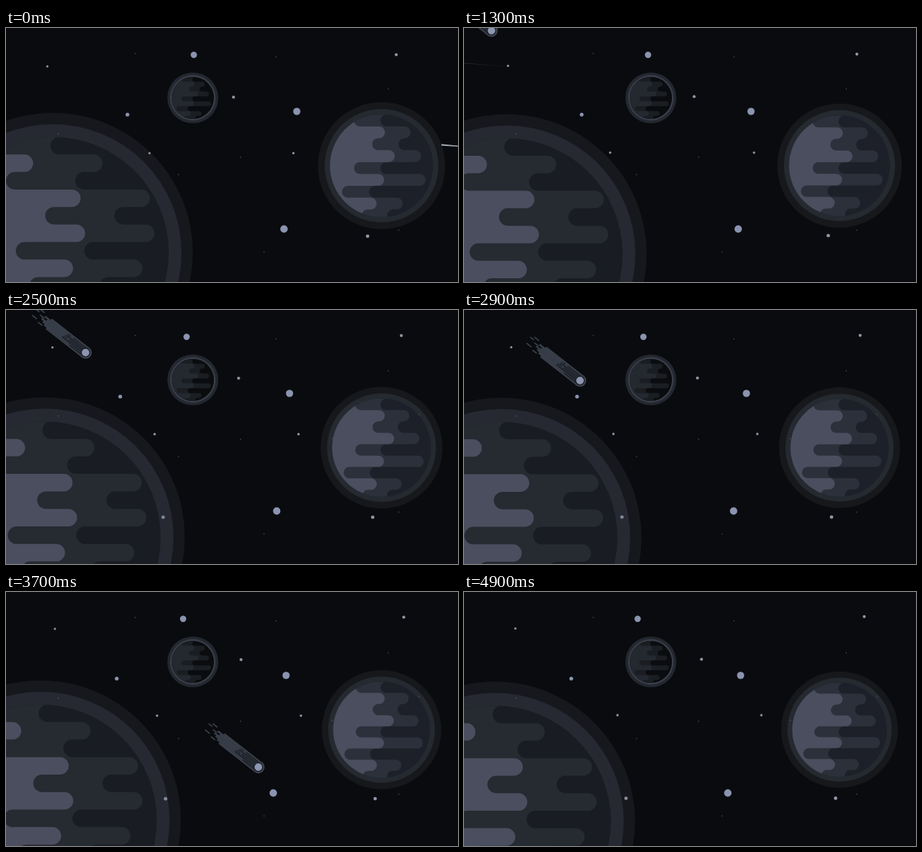
Animation, 600 px wide and 338 px high, one loop 5000 ms. Source, as an HTML page with a canvas:

```html
<!DOCTYPE html>
<html lang="en">
<head>
<meta charset="utf-8">
<title>Planets</title>
<style>
html, body { margin: 0; height: 100%; overflow: hidden; background: #0a0b0e; }
canvas { display: block; width: 100vw; height: 100vh; }
</style>
</head>
<body>
<canvas id="stage" width="600" height="338"></canvas>
<script>
const ctx = document.getElementById('stage').getContext('2d');
const LOOP = 5000, STEP = 100;

// x, y, radius
const dust = [[171.5, 34], [358.5, 38.5], [507.5, 81], [311.5, 172], [229, 195],
  [342.5, 298], [521.5, 269], [69.5, 141], [433, 171], [548, 139]];
const nearStars = [[249.3, 35.7, 4.2], [386, 111, 4.8], [161.2, 115.2, 2.5], [369, 267.5, 4.9]];
const farStars = [[54.9, 51, 1.5], [518, 35.4, 2], [302, 92, 2], [381.5, 166.5, 1.6],
  [190.5, 166.5, 1.6], [480, 277, 2.3], [201.8, 277.1, 2.3]];

// Bands list where each row ends, alternating notch and bar from the top down
const giant = {
  r: 154, row: 23.3, top: -154,
  rings: [[186, 'rgba(102,108,118,.14)'], [171, 'rgba(102,114,140,.19)']],
  base: '#191c23',
  bands: [['#262a31', [-3, 66, 30, 129, 82, 135, 42, 119, 62]],
    ['#4b4e5e', [-130, -26, -62, 37, -10, 43, -49, 27, -31]]]
};
const middle = [-1.5, 38.5, 22.5, 52.5, -1.5, 58.5, -16.5, 28, 7.5];
const left = [-36.5, 4.5, -12.5, 17.5, -36.5, 3.5, -52.5, -6.5, -26.5];
const mid = {
  r: 68.5, row: 15.8, top: -68,
  rings: [[84.5, 'rgba(102,108,118,.13)'], [75.5, 'rgba(102,114,140,.19)']],
  base: '#1d2028',
  bands: [['#2c303a', middle], ['#4a4e5e', left]]
};
const small = {
  ...mid,
  rings: [[82.5, '#23272f'], [73.5, '#3b3f4b']],
  base: '#0b0c0f',
  bands: [['#1a1d21', middle], ['#24282f', left]]
};

function disc(x, y, r, color) {
  ctx.fillStyle = color;
  ctx.beginPath();
  ctx.arc(x, y, r, 0, 7);
  ctx.fill();
}

function bandPath({ row, top }, ends) {
  const r = row / 2;
  ctx.beginPath();
  ctx.moveTo(-400, top);
  ends.forEach((end, i) => {
    const notch = i % 2 === 0;
    ctx.arc(notch ? end + r : end - r, top + i * row + r, r, -Math.PI / 2, Math.PI / 2, notch);
  });
  ctx.lineTo(-400, top + ends.length * row);
}

function planet(p, x, y, scale) {
  ctx.save();
  ctx.translate(x, y);
  ctx.scale(scale, scale);
  for (const [r, color] of p.rings) disc(0, 0, r, color);
  disc(0, 0, p.r, p.base);
  ctx.clip();
  for (const [color, ends] of p.bands) {
    bandPath(p, ends);
    ctx.fillStyle = color;
    ctx.fill();
  }
  ctx.restore();
}

function shootingStar(t) {
  if (t > 2) return;
  const x = 578 - 751 * t + 189 * t * t, y = 155.5 - 131 * t + 32.7 * t * t;
  const length = 160, drop = 12.8;
  const fade = ctx.createLinearGradient(x, y, x + length, y + drop);
  fade.addColorStop(0, 'rgba(190,196,208,1)');
  fade.addColorStop(1, 'rgba(190,196,208,0)');
  ctx.globalAlpha = 0.9 / (1 + 1.6 * t);
  ctx.fillStyle = fade;
  ctx.beginPath();
  ctx.moveTo(x, y - 0.9);
  ctx.lineTo(x + length, y + drop);
  ctx.lineTo(x, y + 0.9);
  ctx.fill();
  ctx.globalAlpha = 1;
}

function streak(x1, x2, y, width, color) {
  ctx.strokeStyle = color;
  ctx.lineWidth = width;
  ctx.beginPath();
  ctx.moveTo(x1, y);
  ctx.lineTo(x2, y);
  ctx.stroke();
}

function comet(t) {
  const u = (t - 1.3) / 0.8;
  const x = 36.5 + 38.5 * u + 20.25 * u * (u - 1) + 10.25 * u * (u - 1) * (u - 2);
  const body = '#39404b', dark = '#20242b';
  ctx.save();
  ctx.translate(x, 3.5 + (x - 36.5) * 0.769);
  ctx.rotate(0.663);
  ctx.lineCap = 'round';
  disc(0, 0, 8.2, '#444a58');
  [-62, -71, -66, -73, -69, -65, -60].forEach((start, i) =>
    streak(start, 0, (i - 3) * 2.3, 2.4, body));
  disc(0, 0, 6.6, dark);
  [-24, -34, -27, -37, -22].forEach((start, i) =>
    streak(start, 0, (i - 2) * 2.6, 2, dark));
  streak(-33, -29, -5.2, 1.4, dark);
  streak(-36, -31, 0, 1.4, dark);
  streak(-83, -76, -8.3, 1.6, body);
  streak(-87, -82, -4.9, 1.6, body);
  streak(-78, -72, -2.3, 1.6, body);
  streak(-86, -79, 4.5, 1.6, body);
  streak(-74, -68, 6.9, 1.6, body);
  disc(0, 0, 5, '#8d95b0');
  ctx.restore();
}

function draw(now) {
  const t = Math.floor(now % LOOP / STEP) * STEP / 1000;
  ctx.fillStyle = '#0a0b0e';
  ctx.fillRect(0, 0, 600, 338);
  for (const [x, y] of dust) disc(x, y, 0.7, '#555b69');
  for (const [x, y, r] of nearStars) disc(x - 3.84 * t, y, r, '#8a94b0');
  for (const [x, y, r] of farStars) disc(x + 2.71 * t, y - 0.53 * t, r, '#8f96a5');
  shootingStar(t);
  planet(giant, 62 - 4.27 * t, 299 + 1.28 * t, 1);
  planet(mid, 498.5, 183.2, 1 - 0.0169 * t);
  planet(small, 248, 93, 0.41);
  comet(t);
}

const begin = performance.now();
function tick() {
  draw(performance.now() - begin);
  requestAnimationFrame(tick);
}
tick();
</script>
</body>
</html>
```
